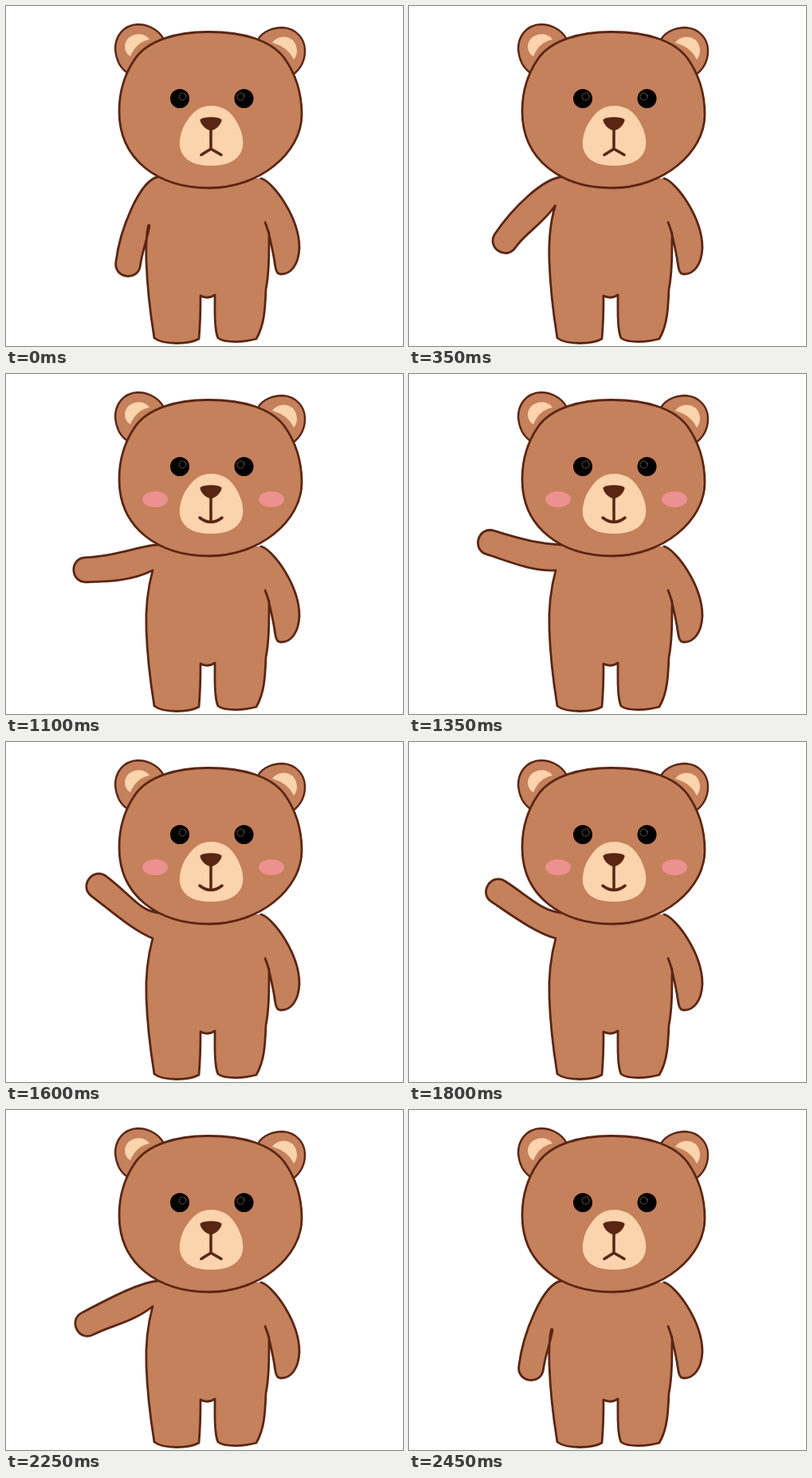
An HTML page that plays this animation: 498x426 px, repeating every 2.5 s.

```html
<!DOCTYPE html>
<html lang="en">
<head>
<meta charset="utf-8">
<title>Waving bear</title>
<style>
  html, body { margin: 0; width: 100%; height: 100%; overflow: hidden; background: #fff; }
  svg { display: block; width: 498px; height: 426px; }
  .fur { fill: #c5805c; }
  .line { stroke: #5a2613; stroke-width: 2.8; stroke-linecap: round; stroke-linejoin: round; }
  .ear { stroke-width: 2.4; }
  .cream { fill: #fbd3ac; }
  .mouth { fill: none; stroke-width: 3.5; }
  .glint { fill: none; stroke: #a8917f; stroke-width: 1; stroke-dasharray: 1.6 1.2; }
  .blush { fill: #eb9190; }
</style>
</head>
<body>
<svg viewBox="0 0 498 426">
  <path id="body" class="fur line"/>
  <g class="fur line ear">
    <path d="M198 42C191 28 176 23 165 23C147 24 137 38 137 54C138 67 143 77 151 83"/>
    <path d="M316 42C322 32 334 27 347 27C364 28 375 41 375 56C375 70 368 80 360 86"/>
  </g>
  <g class="cream">
    <path d="M156 63C147 58 147 45 155 39C163 33 175 34 180 42C169 44 161 51 156 63Z"/>
    <path d="M334 46C339 38 352 36 360 43C367 51 366 62 361 67C356 57 348 50 334 46Z"/>
  </g>
  <path class="fur line" d="M255 32.5C215 32 178 43 162 66C148 86 142 110 142 132C142 192 190 228 255 228C318 228 371 184 371 136C371 112 364 86 349 65C332 43 298 32.5 255 32.5Z"/>
  <circle cx="218" cy="116" r="12"/>
  <circle cx="298.5" cy="116" r="12"/>
  <circle class="glint" cx="221.5" cy="113.5" r="4.5"/>
  <circle class="glint" cx="294.5" cy="113.5" r="4.5"/>
  <path class="cream" d="M257 125C274 125 284 134 291 148C296 158 298 167 297 176C294 192 280 200 257 200C234 200 221 192 218 176C217 165 221 152 227 144C235 131 245 125 257 125Z"/>
  <path fill="#5a2613" d="M243.5 142.5C246 138 268 138 270.5 142.5C271 147 263 156 257 156C251 156 243 147 243.5 142.5Z"/>
  <path id="sad" class="line mouth" d="M257 155V179M245 186.5L257 179L270 186.5"/>
  <g id="happy">
    <path class="line mouth" d="M257 155V184M243 180Q257 191 271 180"/>
    <ellipse class="blush" cx="187" cy="157" rx="16" ry="10"/>
    <ellipse class="blush" cx="333" cy="157" rx="16" ry="10"/>
  </g>
</svg>
<script>
const LOOP = 2500, STEP = 50;
const PIVOT = [187, 230], SHOULDER = [191, 214], HAND = 15.5;
const $ = id => document.getElementById(id);

const linear = p => p;
const easeIn = p => p ** 1.25;
const smooth = p => (1 - Math.cos(Math.PI * p)) / 2;

// Degrees from hanging: arm is the direction from shoulder to hand, wrist the way the hand points.
const keys = [
  { t: 0,    arm: 20,  wrist: 7,   reach: 99, ease: linear },
  { t: 350,  arm: 46,  wrist: 34,  reach: 92, ease: easeIn },
  { t: 700,  arm: 92,  wrist: 100, reach: 93, ease: smooth },
  { t: 1100, arm: 80,  wrist: 88,  reach: 88, ease: smooth },
  { t: 1600, arm: 125, wrist: 127, reach: 86, ease: smooth },
  { t: 2050, arm: 112, wrist: 118, reach: 86, ease: linear },
  { t: 2450, arm: 20,  wrist: 7,   reach: 99, ease: linear }
];

const mix = (a, b, p) => a + (b - a) * p;
const heading = deg => [-Math.sin(deg * Math.PI / 180), Math.cos(deg * Math.PI / 180)];
const move = ([x, y], [dx, dy], d) => [x + dx * d, y + dy * d];
const toward = (a, b, p) => [mix(a[0], b[0], p), mix(a[1], b[1], p)];

function poseAt(t) {
  const i = keys.findLastIndex(k => k.t <= t);
  const a = keys[i], b = keys[i + 1] || a;
  const p = a === b ? 0 : a.ease((t - a.t) / (b.t - a.t));
  const part = name => mix(a[name], b[name], p);
  return { arm: part('arm'), wrist: part('wrist'), reach: part('reach') };
}

// Shoulder, upper edge, round hand, lower edge, armpit.
function armPath({ arm, wrist, reach }) {
  const out = heading(arm), dir = heading(wrist), side = heading(wrist + 90);
  const hand = move(PIVOT, out, reach);
  const top = move(hand, side, HAND), under = move(hand, side, -HAND);
  const hang = Math.max(0, (50 - arm) / 30);
  const pit = [184 - 4 * hang, 246 + 30 * hang];
  const span = Math.hypot(under[0] - pit[0], under[1] - pit[1]);
  const sag = move(toward(pit, under, 0.33), [0, -out[0]], 9);
  const points = [
    move(SHOULDER, [-1, 0.2 * out[1]], 24), move(top, dir, -40), top,
    move(top, dir, HAND * 4 / 3), move(under, dir, HAND * 4 / 3), under,
    move(under, dir, -0.3 * span), sag, pit
  ];
  return 'M' + SHOULDER + 'C' + points.map(q => q.map(v => v.toFixed(2))).join(' ');
}

// Legs, right flank and right arm, continuing from the left armpit.
const rest = 'C178 268 175 293 176 320C177 350 181 385 186 416C198 425 230 424 242 417' +
  'C243.5 400 244 380 244 363Q253 368 262 362L262 380Q262 408 266 416C275 423 300 421 314 417' +
  'C324 400 325 380 326 355C330 335 330 310 330 285L325 271' +
  'C330 282 333 300 336 315C338 327 338 336 345 336C357 336 367 325 368 303' +
  'C368 265 335 220 320 216';

function draw(now) {
  const t = Math.floor((now % LOOP) / STEP) * STEP;
  const smiling = t >= 900 && t < 2250;
  $('body').setAttribute('d', armPath(poseAt(t)) + rest);
  $('sad').style.display = smiling ? 'none' : '';
  $('happy').style.display = smiling ? '' : 'none';
}

const start = performance.now();
function tick() {
  draw(performance.now() - start);
  requestAnimationFrame(tick);
}
tick();
</script>
</body>
</html>
```
